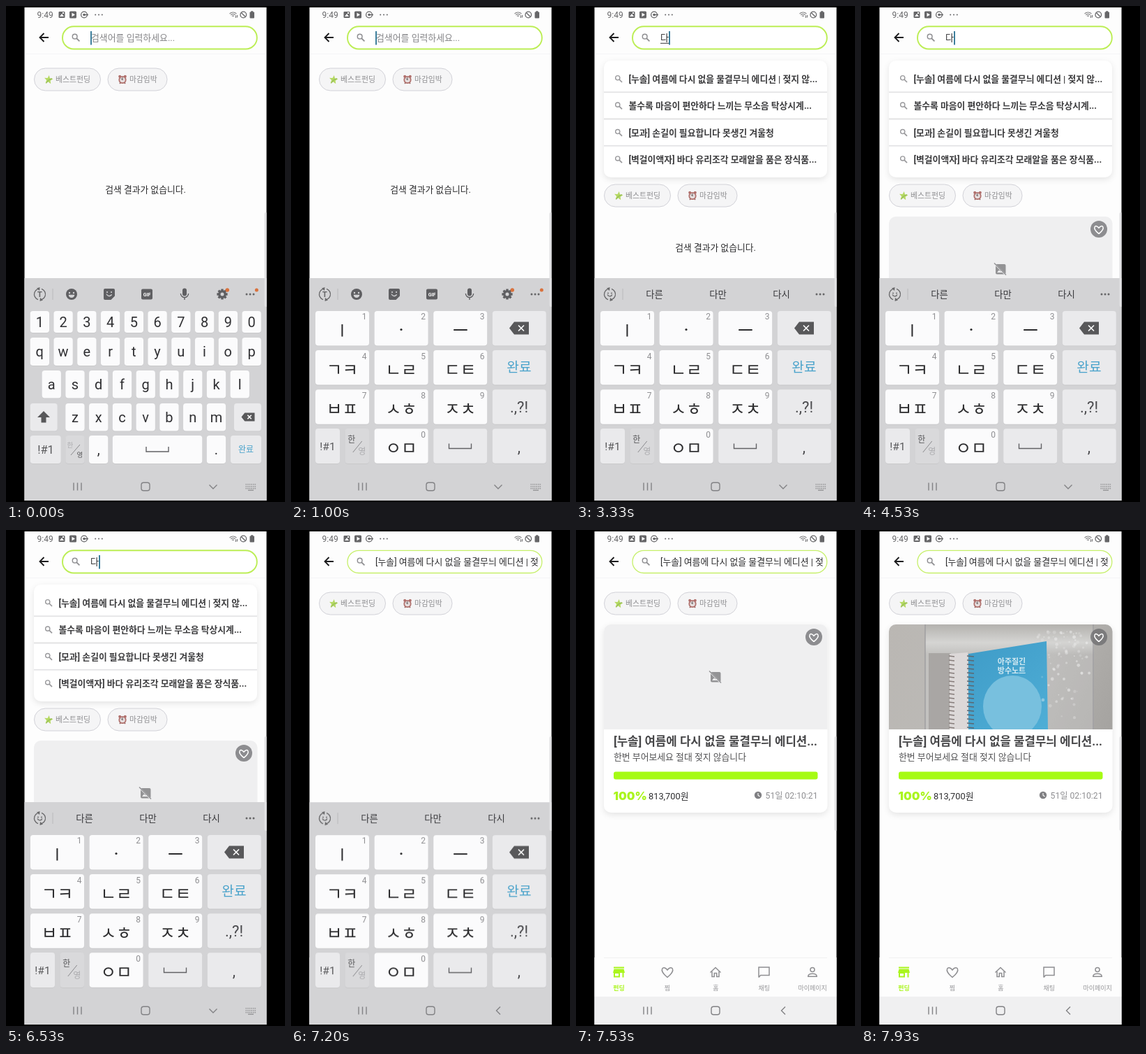
These frames come from a looping animation (400x709 px, 8 s). An HTML page with a canvas:

```html
<!DOCTYPE html>
<html lang="ko">
<head>
<meta charset="utf-8">
<title>Search</title>
<style>
html, body { margin: 0; width: 100%; height: 100%; overflow: hidden; background: #000; }
canvas { display: block; width: 400px; height: 709px; }
</style>
</head>
<body>
<canvas id="c"></canvas>
<script>
const LOOP = 8000, W = 400, H = 709, PI = Math.PI;
const FONT = '"Roboto","Noto Sans CJK KR","Noto Sans CJK",sans-serif';
const LIME = '#aaf51e', GREY = '#8f8f92', INK = '#2c2c2e', BOARD = '#d3d3d5', SOFT = '#8f8f92';
const TITLE = '[누솔] 여름에 다시 없을 물결무늬 에디션';
const ROWS = [
  TITLE + ' | 젖지 않...',
  '볼수록 마음이 편안하다 느끼는 무소음 탁상시계...',
  '[모과] 손길이 필요합니다 못생긴 겨울청',
  '[벽걸이액자] 바다 유리조각 모래알을 품은 장식품...'
];
const CARET_OFF = [[130, 600], [1130, 1600], [2070, 2530], [3530, 4000], [5000, 5530], [6000, 6530], [7070, LOOP]];
const dpr = window.devicePixelRatio || 1;

function sized(canvas) {
  canvas.width = W * dpr;
  canvas.height = H * dpr;
  return canvas.getContext('2d');
}
const screen2d = sized(document.getElementById('c'));
const layer = sized(document.createElement('canvas'));
let g = screen2d;

const within = (t, a, b) => t >= a && t < b;
const clamp = v => Math.max(0, Math.min(1, v));

function paint(fill, stroke, lw = 1) {
  if (fill) { g.fillStyle = fill; g.fill(); }
  if (stroke) { g.strokeStyle = stroke; g.lineWidth = lw; g.stroke(); }
}
function box(x, y, w, h, r, fill, stroke, lw) {
  g.beginPath();
  g.roundRect(x, y, w, h, r);
  paint(fill, stroke, lw);
}
function disc(x, y, r, fill, stroke, lw) {
  g.beginPath();
  g.arc(x, y, r, 0, 2 * PI);
  paint(fill, stroke, lw);
}
function arc(x, y, r, a, b, color, lw) {
  g.beginPath();
  g.arc(x, y, r, a, b);
  paint(null, color, lw);
}
function trace(p) {
  g.beginPath();
  for (let i = 0; i < p.length; i += 2) g.lineTo(p[i], p[i + 1]);
}
function line(color, lw, ...p) { trace(p); paint(null, color, lw); }
function poly(color, ...p) { trace(p); g.closePath(); paint(color); }
function text(s, x, y, size, color, align = 'left', weight = 400, font = FONT) {
  g.font = `${weight} ${size}px ${font}`;
  g.textAlign = align;
  g.fillStyle = color;
  g.fillText(s, x, y + size * 0.37);
}
function dots(x, y, gap, r, color) {
  for (let i = -1; i < 2; i++) disc(x + i * gap, y, r, color);
}
function shadowed(draw) {
  g.save();
  g.shadowColor = 'rgba(0,0,0,.1)';
  g.shadowBlur = 10 * dpr;
  g.shadowOffsetY = 3 * dpr;
  draw();
  g.restore();
}
function lens(x, y, s, color) {
  disc(x - s * 0.25, y - s * 0.25, s * 0.62, null, color, s * 0.28);
  line(color, s * 0.34, x + s * 0.2, y + s * 0.2, x + s, y + s);
}
function heart(x, y, s, color, lw) {
  g.beginPath();
  g.moveTo(x, y + s);
  g.bezierCurveTo(x - s * 2, y - s * 0.6, x - s * 0.8, y - s * 1.6, x, y - s * 0.5);
  g.bezierCurveTo(x + s * 0.8, y - s * 1.6, x + s * 2, y - s * 0.6, x, y + s);
  paint(null, color, lw);
}

function statusBar() {
  const c = '#666668';
  text('9:49', 44.5, 12.5, 12, '#666668');
  box(75.5, 8, 9, 9, 1, c);
  poly('#fff', 77, 15, 80, 11, 83, 15);
  box(81, 9, 2, 2, 0, '#fff');
  box(91, 7.5, 10, 10, 1.5, c);
  poly('#fff', 94.5, 9.8, 94.5, 15.2, 99, 12.5);
  disc(112, 12.5, 4.4, null, c, 1.3);
  disc(112, 12.5, 1.8, c);
  line(c, 1.4, 112, 12.5, 118, 12.5);
  dots(133, 12.5, 4.8, 1, c);
  for (const r of [2, 4.5, 7]) arc(325.5, 16, r, -PI * 0.75, -PI * 0.25, '#7c7c7e', 1.2);
  line(c, 1, 329.5, 13.5, 329.5, 17);
  line(c, 1, 331.5, 13, 331.5, 16.5);
  disc(340.3, 12.5, 4.3, null, c, 1.3);
  line(c, 1.3, 337.3, 9.5, 343.3, 15.5);
  box(349.5, 8.5, 6.5, 9, 1, c);
  box(351.2, 7.3, 3, 2, 0, c);
}

function searchBar(t) {
  const done = t >= 7070;
  line('#1c1c1e', 1.9, 61, 45, 48.5, 45);
  line('#1c1c1e', 1.9, 54.5, 39, 48.5, 45, 54.5, 51);
  box(81, 29.3, 278.8, 32.2, 16.1, '#fff', done ? '#c6f06a' : '#bcee55', done ? 1.3 : 1.9);
  lens(100, 45, 5.4, SOFT);
  line('#f5f5f6', 1, 27, 68.5, 373, 68.5);
  const word = t < 1600 ? '' : t < 2730 ? 'ㄷ' : t < 3000 ? '디' : '다';
  g.save();
  g.beginPath();
  g.rect(119, 30, 242, 31);
  g.clip();
  if (done) text(TITLE + ' | 젖', 121, 45, 12.9, INK);
  else if (word) text(word, 121, 45, 13, INK);
  else text('검색어를 입력하세요...', 122, 45, 12.9, '#858588');
  g.restore();
  if (within(t, 1600, 4530)) line('#3a3a3c', 1, 121, 53.3, 133, 53.3);
  if (!CARET_OFF.some(([a, b]) => within(t, a, b))) box(word ? 133 : 121, 36, 2, 19.5, 0, '#3d7f9c');
}

function chips(y) {
  box(40.5, y - 16, 95, 32, 16, '#f5f5f6', '#d2d2d8');
  box(146, y - 16, 85, 32, 16, '#f5f5f6', '#d2d2d8');
  const star = [];
  for (let i = 0; i < 10; i++) {
    const a = -PI / 2 + 0.12 + i * PI / 5, r = i % 2 ? 2.9 : 6.6;
    star.push(61 + r * Math.cos(a), y + 0.5 + r * Math.sin(a));
  }
  poly('#b5d962', ...star);
  line('#93b95a', 1.2, 57.5, y + 5.5, 61, y + 1, 66, y - 1.5);
  text('베스트펀딩', 71, y, 10.9, SOFT);
  const red = '#b0706c';
  disc(163.2, y - 4.2, 2, red);
  disc(170.8, y - 4.2, 2, red);
  line('#8c5a58', 1.4, 163, y + 6, 164.5, y + 4);
  line('#8c5a58', 1.4, 171, y + 6, 169.5, y + 4);
  disc(167, y + 0.5, 4.7, '#e6dede', red, 1.8);
  line('#5b5454', 1, 165, y - 1.5, 167, y + 0.8, 167, y - 2.8);
  text('마감임박', 177, y, 10.8, SOFT);
}

function dropdown(t) {
  shadowed(() => box(40, 78, 320, 167, 10, '#fff'));
  if (within(t, 6800, 7000)) box(40, 78, 320, 45, [10, 10, 0, 0], '#ececed');
  ROWS.forEach((s, i) => {
    const y = 104 + i * 38.4;
    lens(61, y, 5, '#9a9a9d');
    text(s, 75.5, y, 12.8, '#3c3c3e', 'left', 700);
    if (i) line('#dadadc', 1.4, 40, y - 19.3, 360, y - 19.3);
  });
}

function likeBadge(y) {
  disc(341, y, 12, 'rgba(105,105,107,.72)');
  heart(341, y + 1, 5.6, '#fff', 1.5);
}
function placeholder(y, h) {
  const c = '#939395', bg = '#efeff0', cy = y + 75;
  box(40, y, 320.5, h, [10, 10, 0, 0], bg);
  box(193, cy - 7, 14.5, 14.5, 2, c);
  poly(bg, 195, cy + 5, 198, cy + 1.5, 200, cy + 3.5, 202, cy + 2, 204, cy + 5);
  line(bg, 2, 192, cy - 7, 208, cy + 9);
  line(c, 1.5, 191, cy - 8.5, 208, cy + 8.5);
}

function photo() {
  g.save();
  g.beginPath();
  g.roundRect(40, 135, 320.5, 150, [10, 10, 0, 0]);
  g.clip();
  const bg = g.createLinearGradient(40, 135, 360, 285);
  bg.addColorStop(0, '#bab7b3');
  bg.addColorStop(0.5, '#bcbab7');
  bg.addColorStop(1, '#a5a3a0');
  g.fillStyle = bg;
  g.fillRect(40, 135, 321, 150);
  box(92, 135, 242, 150, 0, 'rgba(205,206,206,.4)');
  const water = g.createLinearGradient(0, 135, 0, 178);
  water.addColorStop(0, 'rgba(176,174,170,.8)');
  water.addColorStop(0.6, 'rgba(218,218,216,.8)');
  water.addColorStop(1, 'rgba(218,218,216,0)');
  box(92, 135, 242, 43, 0, water);
  line('#98979a', 1.2, 92, 135, 92, 285);
  line('#98979a', 1.2, 333, 135, 333, 285);
  box(97, 176, 32, 109, 0, 'rgba(120,116,113,.35)');
  poly('#dcd8d8', 127, 177, 153, 175, 154, 285, 127, 285);
  const blue = g.createLinearGradient(160, 160, 268, 285);
  blue.addColorStop(0, '#3f9cc8');
  blue.addColorStop(1, '#4faed6');
  poly(blue, 154, 177, 266, 159, 268, 285, 154, 285);
  for (let y = 180; y < 285; y += 6) {
    line('#857b79', 1.5, 126, y, 134, y + 1);
    line('#5c6670', 1.5, 152, y, 162, y + 1);
  }
  g.beginPath();
  g.ellipse(217, 252, 42, 44, 0, 0, 2 * PI);
  paint('#78c0de');
  text('아주질긴', 216, 188, 11, '#d5eaf2', 'center', 700);
  text('방수노트', 216, 201, 11, '#d5eaf2', 'center', 700);
  let seed = 7;
  const rnd = () => (seed = seed * 16807 % 2147483647) / 2147483647;
  for (let i = 0; i < 80; i++) {
    const x = 272 + rnd() * 58 - rnd() * 20, y = 145 + rnd() * rnd() * 130;
    disc(x, y, 0.6 + rnd() * 1.9, `rgba(245,245,245,${0.15 + rnd() * 0.35})`);
  }
  g.restore();
}

function resultCard(t) {
  shadowed(() => box(40, 135, 320.5, 269, 10, '#fff'));
  placeholder(135, 150);
  g.globalAlpha = clamp((t - 7670) / 250);
  photo();
  g.globalAlpha = 1;
  likeBadge(153);
  text(TITLE + '...', 54, 301.5, 16.8, '#464648', 'left', 700);
  text('한번 부어보세요 절대 젖지 않습니다', 54, 324.5, 12.85, '#505052');
  box(54, 345.5, 292.5, 11, 3, '#a6fb14');
  text('100%', 53.5, 380, 16.5, LIME, 'left', 900, '"Inter",sans-serif');
  text('813,700원', 104, 380.5, 12.8, INK);
  disc(261, 379, 5.2, '#808083');
  line('#fff', 1.1, 261, 376, 261, 379.3, 263.5, 381);
  text('51일 02:10:21', 346.5, 379.5, 12.2, GREY, 'right');
}

function tabs() {
  const c = SOFT;
  box(26, 611, 348, 56, 0, '#fdfdfd');
  line('#f1f1f2', 1, 40, 611.5, 360, 611.5);
  box(54, 624.5, 15, 2, 0, LIME);
  poly(LIME, 54.5, 627.5, 68.5, 627.5, 70, 633, 53, 633);
  box(54, 633, 9, 6.5, 0, LIME);
  box(56, 634, 5, 3.5, 0, '#fff');
  box(66.5, 633, 2, 6.5, 0, LIME);
  heart(131, 632.5, 7, c, 1.5);
  line(c, 1.5, 192.5, 632.5, 200, 625.5, 207.5, 632.5);
  line(c, 1.5, 195, 631, 195, 638.5, 198.3, 638.5, 198.3, 633.5, 201.7, 633.5, 201.7, 638.5, 205, 638.5, 205, 631);
  line(c, 1.5, 262, 639.5, 262, 625, 277, 625, 277, 636.5, 264.5, 636.5, 262, 639.5);
  disc(339, 628.5, 3, null, c, 1.5);
  g.beginPath();
  g.moveTo(332.8, 638.2);
  g.bezierCurveTo(332.8, 633, 345.2, 633, 345.2, 638.2);
  g.closePath();
  paint(null, c, 1.5);
  ['펀딩', '찜', '홈', '채팅', '마이페이지'].forEach((s, i) =>
    text(s, 61.5 + i * 69.4, 655, 9, i ? '#969699' : LIME, 'center', i ? 400 : 700));
}

const WHITE = '#fbfbfc', PALE = '#eaeaec', DIM = '#d9d9db';

function key(x, y, w, h, fill, down) {
  box(x, y + 0.8, w, h, 4, '#c6c6c8');
  box(x, y, w, h, 4, down ? '#b2b2b4' : fill);
}
function backspace(x, y, s) {
  poly('#58585a', x - 14 * s, y, x - 7 * s, y - 9 * s, x + 14 * s, y - 9 * s, x + 14 * s, y + 9 * s, x - 7 * s, y + 9 * s);
  line('#fff', 1.6, x - 1 * s, y - 4 * s, x + 7 * s, y + 4 * s);
  line('#fff', 1.6, x + 7 * s, y - 4 * s, x - 1 * s, y + 4 * s);
}
function langKey(x, w, hangul, down) {
  const k = hangul ? 1 : 0, cx = x + w / 2, dark = '#58585a', soft = '#acacaf';
  key(x, 614 - 10 * k, w, 40 + 10 * k, DIM, down);
  text('한', cx - 7 - k, 627 - 7 * k, 9.5 + 2.5 * k, k ? dark : soft, 'center');
  line('#8a8a8d', 1, cx - 6, 642 - 4 * k, cx + 7, 627 - 5 * k);
  text('영', cx + 7, 641 - 4 * k, 9.5 + 2.5 * k, k ? soft : dark, 'center');
}
function spaceMark(x, y) { line('#626265', 1.4, x - 16, y - 4, x - 16, y + 3, x + 16, y + 3, x + 16, y - 4); }

function latinKeys(t) {
  const row = (s, x, y, h) => [...s].forEach((ch, i) => {
    key(x + i * 33.75, y, 27.3, h, WHITE);
    text(ch, x + i * 33.75 + 13.6, y + h / 2, 20, '#303033', 'center');
  });
  row('1234567890', 34.7, 436, 31);
  row('qwertyuiop', 34.7, 474, 40);
  row('asdfghjkl', 51.6, 521, 39.5);
  row('zxcvbnm', 85.3, 568, 39.5);
  key(34.7, 568, 39, 39.5, PALE);
  poly('#58585a', 54, 579, 63, 588, 57.5, 588, 57.5, 595.5, 50.5, 595.5, 50.5, 588, 45, 588);
  key(327, 568, 39, 39.5, PALE);
  backspace(347, 587.5, 0.68);
  key(34.7, 614, 44, 40, PALE);
  text('!#1', 57, 634, 16.5, '#58585a', 'center');
  langKey(85.3, 27.3, false, within(t, 70, 200));
  row(',', 119, 614, 40);
  key(152.8, 614, 128.5, 40, WHITE);
  spaceMark(217, 634);
  row('.', 287.8, 614, 40);
  key(322, 614, 44, 40, PALE);
  text('완료', 344, 634, 12, '#4aa3cb', 'center');
}

function hangulKeys(t) {
  const labels = ['ㅣ', '·', 'ㅡ', 'ㄱㅋ', 'ㄴㄹ', 'ㄷㅌ', 'ㅂㅍ', 'ㅅㅎ', 'ㅈㅊ'];
  const colX = c => 35 + c * 84.6, rowY = r => 436 + r * 56.1;
  const down = within(t, 1070, 1130) ? 5 : within(t, 2530, 2730) ? 0 : within(t, 2870, 3070) ? 1 : -1;
  const jamo = (s, c, r, num, on) => {
    const x = colX(c), y = rowY(r);
    key(x, y, 77, 49.5, WHITE, on);
    text(num, x + 70, y + 8, 12, SOFT, 'center');
    if (s === 'ㅣ') box(x + 37.4, y + 19, 2, 17.5, 0, INK);
    else if (s === '·') disc(x + 38.4, y + 26.5, 1.6, INK);
    else if (s === 'ㅡ') box(x + 29, y + 26, 19.5, 2, 0, INK);
    else text(s, x + 38.5, y + 28, 24.6, INK, 'center', 500);
  };
  labels.forEach((s, i) => jamo(s, i % 3, Math.floor(i / 3), i + 1, i === down));
  jamo('ㅇㅁ', 1, 3, 0);
  for (let r = 0; r < 4; r++) key(colX(3), rowY(r), 77, 49.5, PALE);
  backspace(327, 460.5, 1);
  text('완료', 327, 516, 19.2, '#4aa3cb', 'center', 500);
  text('.,?!', 327, 573, 22, '#4c4c4f', 'center');
  text(',', 327, 630, 22, '#4c4c4f', 'center');
  key(35, 604, 35, 50, PALE);
  text('!#1', 52.5, 629, 15.5, '#58585a', 'center');
  langKey(77.5, 34.5, true);
  key(colX(2), rowY(3), 77, 49.5, PALE);
  spaceMark(242.5, 629.5);
}

function swapIcon(face) {
  const c = '#666668';
  arc(48.5, 412, 8, -PI * 0.4, PI * 0.38, c, 1.3);
  arc(48.5, 412, 8, PI * 0.6, PI * 1.38, c, 1.3);
  poly(c, 49, 417, 53, 420.5, 48.5, 422);
  poly(c, 48, 407, 44, 403.5, 48.5, 402);
  if (face) {
    disc(46, 410.5, 0.9, c);
    disc(51, 410.5, 0.9, c);
    arc(48.5, 411.5, 3.4, 0.3, PI - 0.3, c, 1.2);
  } else text('T', 48.5, 412, 11, c, 'center', 700);
  line('#b9b9bc', 1, 67, 404, 67, 420);
}
function toolbar() {
  const c = '#5f5f62';
  disc(94, 412, 8, c);
  disc(91, 410, 1.2, BOARD);
  disc(97, 410, 1.2, BOARD);
  g.beginPath();
  g.arc(94, 412.8, 4.3, 0, PI);
  paint(BOARD);
  box(140, 404, 16, 16, 2, c);
  poly(BOARD, 150, 420.5, 156.5, 414, 156.5, 420.5);
  poly(c, 150.8, 418.8, 150.8, 414.8, 155, 414.8);
  disc(145, 409, 1.1, BOARD);
  disc(151, 409, 1.1, BOARD);
  arc(148, 410.5, 4, 0.5, PI - 0.3, BOARD, 1.3);
  box(194, 404.5, 16, 15, 2, c);
  text('GIF', 202, 412.2, 7, '#fff', 'center', 700);
  box(253, 403.5, 6, 11, 3, c);
  arc(256, 411, 5.6, 0, PI, c, 1.4);
  line(c, 1.4, 256, 416.5, 256, 420);
  for (let i = 0; i < 4; i++) {
    const a = i * PI / 4, x = 7.6 * Math.cos(a), y = 7.6 * Math.sin(a);
    line(c, 3.4, 310 - x, 412 - y, 310 + x, 412 + y);
  }
  disc(310, 412, 4.2, BOARD, c, 3.4);
  disc(317.3, 406, 2.7, '#d9713c');
  disc(359.3, 406, 2.5, '#d9713c');
}
function keyboard(t) {
  box(26, 389, 348, 318, 0, BOARD);
  swapIcon(t >= 1800);
  dots(350, 412, 5, 1.5, '#666668');
  if (t < 1800) toolbar();
  else (t < 3130 ? ['다', '다른', '다만'] : ['다른', '다만', '다시']).forEach((s, i) =>
    text(s, 112.5 + i * 91, 412, 13.4, '#3a3a3d', 'center', 500));
  if (t < 400) latinKeys(t); else hangulKeys(t);
}

// Flattened first, so that keys and board fade as one sheet.
function fadingKeyboard(t, alpha, dy) {
  g = layer;
  g.setTransform(dpr, 0, 0, dpr, 0, 0);
  g.clearRect(0, 0, W, H);
  keyboard(t);
  g = screen2d;
  g.globalAlpha = alpha;
  g.drawImage(layer.canvas, 0, dy, W, H);
  g.globalAlpha = 1;
}

function navBar(open) {
  const c = '#828285';
  for (const x of [97, 102.5, 108]) line(c, 1.4, x, 681.5, x, 692.5);
  box(194, 681.3, 12, 11.5, 3.2, null, c, 1.4);
  if (!open) {
    line(c, 1.4, 300, 681.5, 294.5, 687, 300, 692.5);
    return;
  }
  line(c, 1.4, 291.5, 684.5, 297, 690, 302.5, 684.5);
  for (let r = 0; r < 3; r++)
    for (let i = 0; i < 6; i++) box(343.5 + i * 2.6, 683 + r * 2.9, 1.6, 1.6, 0, '#9a9a9c');
  box(347, 691.5, 8, 1.4, 0, '#9a9a9c');
}

function draw(t) {
  g.setTransform(dpr, 0, 0, dpr, 0, 0);
  g.fillStyle = '#000';
  g.fillRect(0, 0, W, H);
  g.save();
  g.beginPath();
  g.rect(26.5, 2, 347, 705);
  g.clip();
  box(26, 2, 348, 705, 0, '#fdfdfd');
  statusBar();
  searchBar(t);

  const listed = within(t, 3270, 7070);
  if (listed) dropdown(t);
  chips(listed ? 271 : 105);
  if (t < 3530 && !within(t, 2070, 2130))
    text('검색 결과가 없습니다.', 200, listed ? 345 : 262, 12.8, INK, 'center');
  if (within(t, 3800, 7070)) {
    g.globalAlpha = clamp((t - 3800) / 330);
    placeholder(301, 120);
    likeBadge(319);
    g.globalAlpha = 1;
  }
  if (within(t, 7300, 7530)) {
    const a = -PI * 0.47 + (t - 7330) / 500;
    arc(200, 375.5, 17, a, a + 0.22 + Math.max(0, t - 7330) / 90, LIME, 3.5);
  }
  if (t >= 7530) resultCard(t);

  const p = clamp((t - 7200) / 260);
  if (p > 0) {
    tabs();
    box(26, 667, 348, 40, 0, '#f0f0f1');
  }
  if (p === 0) keyboard(t);
  else if (p < 1) fadingKeyboard(t, 1 - Math.pow(p, 1.25), 43 * p);
  navBar(p === 0);
  box(370.5, 295, 4, 135, 2, '#e2e2e4');
  g.restore();
}

function loop() {
  draw(performance.now() % LOOP);
  requestAnimationFrame(loop);
}
loop();
</script>
</body>
</html>
```
